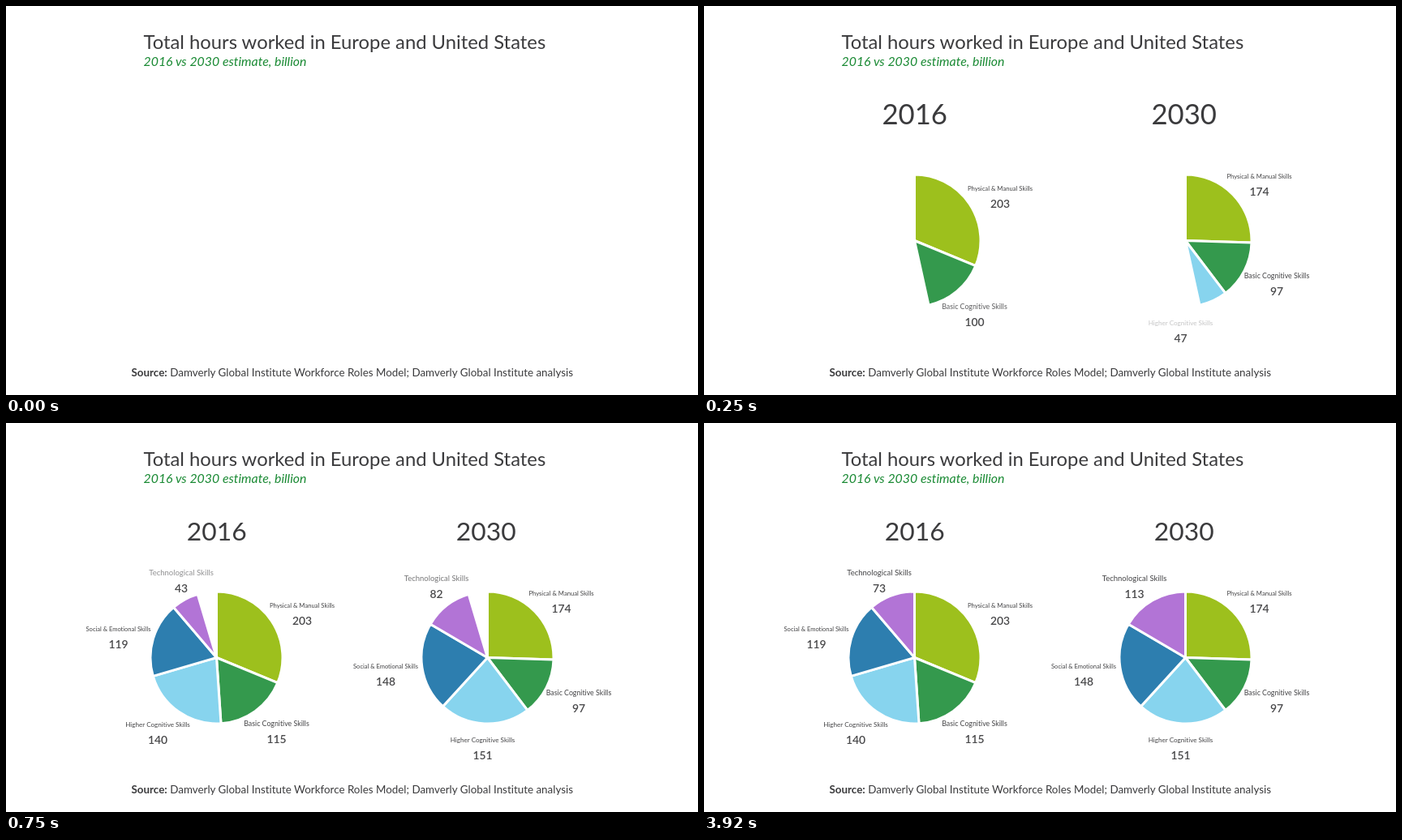
An HTML page for the animation above (4.01 s loop, 853x480 px).

```html
<!DOCTYPE html>
<html lang="en">
<head>
<meta charset="utf-8">
<title>Total hours worked</title>
<style>
  html, body { margin: 0; width: 100%; height: 100%; overflow: hidden; background: #fff; }
  svg { display: block; width: 100%; height: 100%; font-family: Lato, sans-serif;
    font-variant-ligatures: none; fill: #3b3b3d; }
  .title { font-size: 23.82px; }
  .sub { font-size: 15.86px; font-style: italic; fill: #1a8a34; }
  .note { font-size: 13.4px; }
  .year { font-size: 31.8px; text-anchor: middle; }
  .label { text-anchor: middle; fill: #444446; }
  .num { font-size: 13.9px; font-weight: 600; text-anchor: middle; fill: #48484a; }
  .slice { stroke: #fff; stroke-width: 3; stroke-linejoin: round; }
</style>
</head>
<body>
<svg id="stage" viewBox="0 0 853 480">
  <text class="title" x="169.5" y="53">Total hours worked in Europe and United States</text>
  <text class="sub" x="169.5" y="74">2016 vs 2030 estimate, billion</text>
  <text class="note" x="154.5" y="457"><tspan font-weight="700">Source:</tspan> Damverly Global Institute Workforce Roles Model; Damverly Global Institute analysis</text>
</svg>
<script>
const LOOP = 4010, STEP = 1000 / 12, RADIUS = 81.5;
const stage = document.getElementById('stage');

// name, font size, colour
const skills = [
  ['Physical & Manual Skills', 7.68, '#9dc01d'],
  ['Basic Cognitive Skills', 8.8, '#34994d'],
  ['Higher Cognitive Skills', 8.15, '#87d4ee'],
  ['Social & Emotional Skills', 7.53, '#2d7eaf'],
  ['Technological Skills', 9.5, '#b274d6']
];

// spots: centre of each label
const pies = [
  { year: 2016, x: 259.5, y: 289.5, yearX: 259.7, values: [203, 115, 140, 119, 73],
    spots: [[365, 225], [333.5, 371], [187, 372], [138.5, 254], [216, 184.5]] },
  { year: 2030, x: 593.5, y: 289.5, yearX: 591.7, values: [174, 97, 151, 148, 113],
    spots: [[684.5, 210], [706, 333], [587.5, 391], [468, 300], [530.5, 192]] }
];

function add(tag, attrs, text = '') {
  const el = document.createElementNS('http://www.w3.org/2000/svg', tag);
  for (const key in attrs) el.setAttribute(key, attrs[key]);
  el.textContent = text;
  stage.appendChild(el);
  return el;
}

for (const pie of pies) {
  pie.total = pie.values.reduce((a, b) => a + b);
  pie.title = add('text', { class: 'year', y: 11.7 }, pie.year);
  pie.slices = skills.map(s => add('path', { class: 'slice', fill: s[2] }));
  pie.labels = skills.map(([name, size], i) => {
    const [x, y] = pie.spots[i];
    return add('text', { class: 'label', x, y: y + 3, 'font-size': size }, name);
  });
  pie.nums = pie.spots.map(([x, y]) => add('text', { class: 'num', x, y: y + 24 }));
}

const clamp = v => Math.min(1, Math.max(0, v));
const sweepAt = t => 1 - Math.pow(1 - clamp((t - 22) / 1028.4), 2.5);

function popAt(t) {
  const u = clamp((t + 33) / 548) - 1;
  return 1 + 2.70158 * u ** 3 + 1.70158 * u ** 2;
}

function wedge({ x, y }, from, to) {
  const point = f => {
    const a = f * 2 * Math.PI;
    return (x + RADIUS * Math.sin(a)).toFixed(2) + ' ' + (y - RADIUS * Math.cos(a)).toFixed(2);
  };
  return `M${x} ${y}L${point(from)}A${RADIUS} ${RADIUS} 0 0 1 ${point(to)}Z`;
}

function draw(time) {
  // the motion advances at twelve steps a second
  const t = Math.round(Math.floor((time + 4) / STEP) * STEP / 10) * 10;
  const sweep = sweepAt(t), pop = popAt(t);
  for (const pie of pies) {
    pie.title.setAttribute('transform', `translate(${pie.yearX} 133.5) scale(${pop})`);
    pie.title.setAttribute('opacity', t > 0 ? 1 : 0);
    let start = 0;
    pie.values.forEach((value, i) => {
      const grown = Math.min(value, Math.max(0, sweep * pie.total - start));
      const shown = Math.round(grown);
      pie.slices[i].setAttribute('d',
        grown > 0 ? wedge(pie, start / pie.total, (start + grown) / pie.total) : '');
      pie.labels[i].setAttribute('opacity', grown / value);
      pie.nums[i].textContent = shown || '';
      start += value;
    });
  }
}

const begin = performance.now();
function tick() {
  draw((performance.now() - begin) % LOOP);
  requestAnimationFrame(tick);
}
tick();
</script>
</body>
</html>
```
